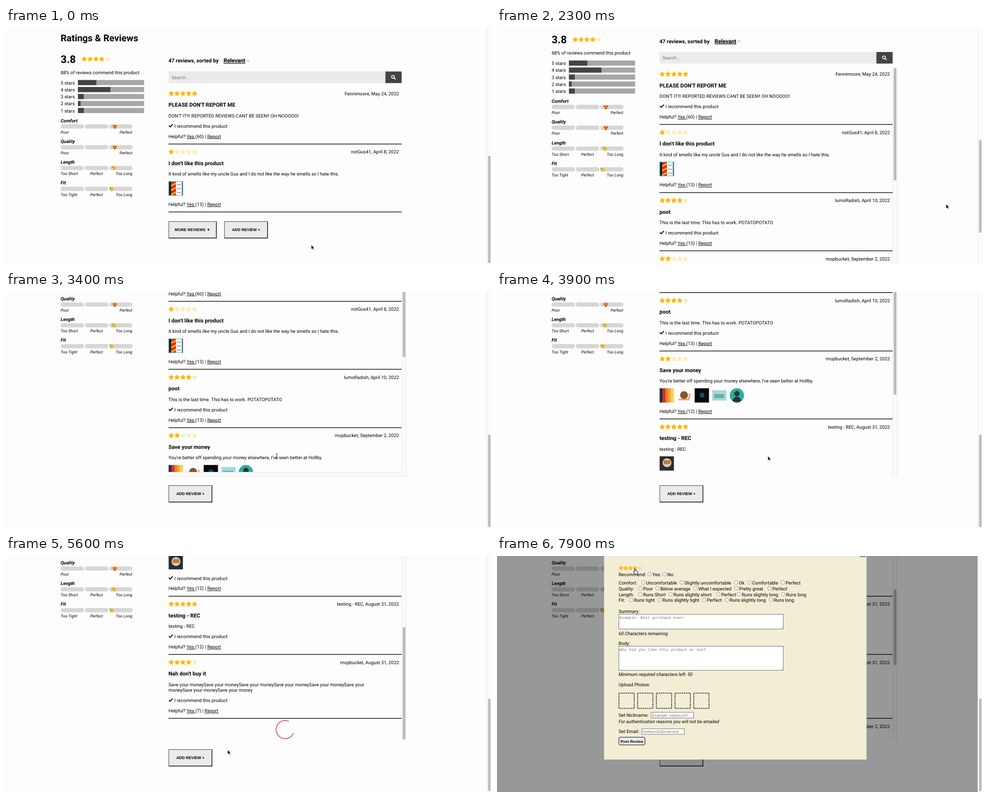
An HTML page that plays this animation: 985x480 px, repeating every 8 s.

```html
<!DOCTYPE html>
<html lang="en">
<head>
<meta charset="utf-8">
<title>Ratings &amp; Reviews</title>
<style>
html, body { margin: 0; width: 100%; height: 100%; overflow: hidden; background: #fdfdfd; }
svg { display: block; }
text { font-family: Roboto, sans-serif; white-space: pre; text-rendering: geometricPrecision; }
.b { font-weight: 700; }
.i { font-style: italic; }
.u { text-decoration: underline; }
.a { font-family: "Liberation Sans", Arial, sans-serif; }
.m { font-family: "Liberation Mono", "Courier New", monospace; }
.p { fill: #757575; }
</style>
</head>
<body>
<svg id="stage" width="985" height="480" viewBox="0 0 985 480"></svg>
<script>
const BODY = 9.45, SMALL = 7.9;
const GOLD = '#ffb70f', PALE = '#fdebbb';

// --- drawing helpers; y is the vertical middle of a text line ---
const text = (x, y, s, cls = '', size = BODY, anchor = 'start') =>
  `<text x="${x}" y="${y + size * .355}" class="${cls}" font-size="${size}" text-anchor="${anchor}">${s}</text>`;
const rect = (x, y, w, h, fill, more = '') =>
  `<rect x="${x}" y="${y}" width="${w}" height="${h}" fill="${fill}" ${more}/>`;
const disc = (x, y, r, fill, more = '') =>
  `<circle cx="${x}" cy="${y}" r="${r}" fill="${fill}" ${more}/>`;
const line = (d, color = '#000', width = 1, more = '') =>
  `<path d="${d}" fill="none" stroke="${color}" stroke-width="${width}" ${more}/>`;
const group = (id, s, more = '') => `<g id="${id}" ${more}>${s}</g>`;

function star(x, y, r, fill, cls = '') {
  const points = Array.from({ length: 10 }, (_, k) => {
    const a = (k / 5 - .5) * Math.PI, d = k % 2 ? r * .52 : r;
    return `${(x + d * Math.cos(a)).toFixed(2)},${(y + .3 + d * Math.sin(a)).toFixed(2)}`;
  });
  return `<polygon class="${cls}" points="${points.join(' ')}" fill="${fill}" stroke="${fill}" stroke-width=".9" stroke-linejoin="round"/>`;
}
const stars = (x, y, n) =>
  [0, 1, 2, 3, 4].map(k => star(x + k * 11.85, y, 5.3, k < n ? GOLD : PALE)).join('');

// --- left column ---
const faces = {
  love: disc(0, 0, 4.7, '#ffc83d') + disc(-2.3, -1.2, 1.8, '#e8253c') + disc(2.3, -1.2, 1.8, '#e8253c') +
    '<path d="M-2.3 1.3H2.3Q1.8 3.8 0 3.8T-2.3 1.3Z" fill="#6b3a1a"/>',
  sweat: disc(0, 0, 4.7, '#ffc83d') + line('M-2.5-.6h1.8M1-.6h1.8M-1 2.6q1-1 2.2 0', '#6b3a1a', .8) +
    disc(-3, -2.2, 1.6, '#55b4e8')
};
function trait(k, name, labels, face, x) {
  const y = 188.2 + k * 42.3;
  const ends = [[111, 'start'], [184, 'middle'], [256.5, 'end']];
  return text(111, y, name, 'b i') +
    [111, 160.2, 209.4].map(s => rect(s, y + 7.7, 47.5, 8.6, '#d6d6d6', 'rx="4.3"')).join('') +
    `<g transform="translate(${x} ${y + 12.2})">${faces[face]}</g>` +
    labels.map((s, n) => text(ends[n][0], y + 23.6, s, 'i', 8.27, ends[n][1])).join('');
}
const summary =
  text(111, 20.5, 'Ratings &amp; Reviews', 'b', 18.95) +
  text(111, 63, '3.8', 'b', 21.3) + stars(159, 63, 4) +
  text(111, 90.5, '88% of reviews commend this product') +
  [37.5, 66, 12, 5.5, 12].map((w, k) => {
    const y = 111 + k * 14.2;
    return text(111, y + .4, `${5 - k} stars`) + rect(146, y - 5.2, 134.5, 10.4, '#a6a6a6') + rect(146, y - 5.2, w, 10.4, '#444');
  }).join('') +
  trait(0, 'Comfort', ['Poor', '', 'Perfect'], 'love', 221) +
  trait(1, 'Quality', ['Poor', '', 'Perfect'], 'love', 221) +
  trait(2, 'Length', ['Too Short', 'Perfect', 'Too Long'], 'sweat', 219.5) +
  trait(3, 'Fit', ['Too Tight', 'Perfect', 'Too Long'], 'sweat', 214.5);

const header =
  text(330, 66.5, '47 reviews, sorted by', 'b', 10.65) +
  rect(441, 61, 46, 11, '#ebebeb') + text(442, 66.5, 'Relevant', 'b u', 11.2) +
  line('M489 65.3l2.4 2.2 2.4-2.2', '#444', .9) +
  rect(330, 88.5, 440.5, 23.5, '#ebebeb') + text(336, 100.4, 'Search...', 'p') +
  rect(770.5, 88.5, 33, 23.5, '#444') +
  disc(786, 99.4, 2.9, 'none', 'stroke="#fff" stroke-width="1.5"') + line('M788.2 101.6l3 3', '#fff', 1.8);

// --- review list ---
const pics = {
  card: rect(0, 0, 29, 29, '#fff') + rect(0, 0, 6, 29, '#181818') + rect(5, 0, 10, 29, '#d8321f') +
    line('M5 9l10-5M5 18l10-5M5 27l10-5', '#f6b21b', 3) + line('M17 7h8M17 15h8M17 23h8', '#888', 1.5) +
    rect(27, 0, 2, 29, '#222') + rect(.5, .5, 28, 28, 'none', 'stroke="#35b8e0"'),
  stripes: ['#1f2f3f', '#c8322c', '#ee7a24', '#f4a52a', '#fad06a'].map((c, k) => rect(k * 5.8, 0, 5.9, 29, c)).join(''),
  snail: disc(14, 14, 8, '#8a5528') + line('M3 23h20l3-13', '#d9a765', 3),
  night: rect(0, 0, 29, 29, '#07090c') + disc(15, 14, 5, '#12535f'),
  sea: rect(0, 4, 29, 21, '#a5d9e4') + rect(4, 12, 20, 8, '#6fae9c'),
  person: disc(14.5, 14.5, 14.5, '#2bae9c') + disc(14.5, 11, 5.5, '#26333a') +
    '<path d="M5 25q9.5-16 19 0-9.5 8-19 0Z" fill="#26333a"/>',
  lunch: rect(0, 0, 29, 29, '#2c2d33') + disc(15, 13, 9, '#d9cdbd') + rect(8, 8, 14, 8, '#c47a35', 'rx="3"')
};
const reviews = [
  { by: 'Fennimoore, May 24, 2022', n: 5, title: "PLEASE DON'T REPORT ME",
    body: ["DON'T IT!!! REPORTED REVIEWS CANT BE SEEN!! OH NOOOOO!"], rec: 1, yes: 60 },
  { by: 'notGus41, April 8, 2022', n: 1, title: "I don't like this product",
    body: ['It kind of smells like my uncle Gus and I do not like the way he smells so I hate this.'], pics: ['card'], yes: 13 },
  { by: 'lumoRadish, April 10, 2022', n: 4, title: 'poot',
    body: ['This is the last time. This has to work. POTATOPOTATO'], rec: 1, yes: 13 },
  { by: 'mopbucket, September 2, 2022', n: 2, title: 'Save your money',
    body: ["You're better off spending your money elsewhere, I've seen better at Hollby."],
    pics: ['stripes', 'snail', 'night', 'sea', 'person'], yes: 12 },
  { by: 'testing - REC, August 31, 2022', n: 5, title: 'testing - REC', body: ['testing - REC'], pics: ['lunch'], rec: 1, yes: 12 },
  { by: 'testing - REC, August 31, 2022', n: 5, title: 'testing - REC', body: ['testing - REC'], rec: 1, yes: 12 },
  { by: 'mopbucket, August 31, 2022', n: 4, title: "Nah don't buy it",
    body: ['Save your money'.repeat(5) + 'Save your', 'money' + 'Save your money'.repeat(2)], rec: 1, yes: 7 },
  { by: 'mopbucket, September 2, 2022', n: 2, title: 'Save your money', body: ['Save your money'], yes: 7, late: 1 }
];
let reviewY = 133.2;
function review(r) {
  let y = reviewY + 45;
  let s = stars(335.6, reviewY, r.n) + text(798, reviewY, r.by, '', BODY, 'end') +
    text(330, reviewY + 23.3, r.title, 'b', 11);
  r.body.forEach((row, k) => s += text(330, y + k * 11.4, row));
  y += (r.body.length - 1) * 11.4 + 21;
  if (r.pics) {
    s += r.pics.map((p, k) => `<g transform="translate(${330.3 + k * 35.6} ${y - 6})">${pics[p]}</g>`).join('');
    y += 40.8;
  }
  if (r.rec) {
    s += line(`M330.8 ${y - .8}l2.6 2.7 5.4-5.6`, '#000', 1.8) + text(342, y + .2, 'I recommend this product');
    y += 21;
  }
  s += text(330, y, `Helpful? <tspan class="u">Yes </tspan>(${r.yes}) | <tspan class="u">Report</tspan>`);
  s += line(`M330 ${y + 15.7}H803.5`, '#222', 1.5);
  reviewY = y + 31.6;
  return r.late ? group('late', s) : s;
}
const list = reviews.map(review).join('') +
  group('spin', disc(0, 0, 21, 'none', 'stroke="#cf2222" stroke-width="1.4" pathLength="4" stroke-dasharray="3 1" transform="rotate(135)"'));

const button = (id, x, w, label) => group(id,
  rect(x, 393, w, 35, '#ebebeb', 'class="face"') +
  line(`M${x} 427.3H${x + w - .7}V393`, '#111', 1.4) + line(`M${x + .6} 428V393.6H${x + w}`, '#666', 1.2) +
  text(x + w / 2, 410.3, label, 'a b', SMALL, 'middle'));

// --- review form ---
const choices = [
  [37.8, 'Recommend:', [310, 'Yes:', 340, 'No:']],
  [54.5, 'Comfort:', [297, 'Uncomfortable', 375, 'Slightly uncomfortable', 485.5, 'Ok', 512.5, 'Comfortable', 580.5, 'Perfect']],
  [66.3, 'Quality:', [291, 'Poor', 326, 'Below average', 403, 'What I expected', 486, 'Pretty great', 553.5, 'Perfect']],
  [78.2, 'Length:', [291, 'Runs Short', 352.5, 'Runs slightly short', 449.5, 'Perfect', 491.5, 'Runs slightly long', 581, 'Runs long']],
  [90, 'Fit:', [272.5, 'Runs tight', 330.5, 'Runs slightly tight', 420.5, 'Perfect', 466.5, 'Runs slightly long', 556, 'Runs long']]
];
const choiceRow = ([y, name, items]) => text(247, y, name) + items.map((v, k) =>
  k % 2 ? text(items[k - 1] + 5.7, y, v) : disc(v, y - .7, 3.7, '#fff', 'stroke="#767676" stroke-width=".8"')).join('');
const field = (x, y, w, h) => rect(x + .5, y + .5, w - 1, h - 1, '#fff', 'stroke="#767676"');
const area = (y, h, hint) => field(247, y, 335, h) + text(249, y + 7, hint, 'm p', SMALL) +
  line(`M576.5 ${y + h - 2}l4-4M579 ${y + h - 2}l1.5-1.5`, '#888', .7);
const form =
  rect(0, 0, 977, 480, '#000', 'opacity=".4"') + rect(217.5, 0, 533, 414, '#f2edd5') +
  rect(737.5, -10, 11.5, 11.5, '#efefef', 'stroke="#222" rx="2"') +
  [0, 1, 2, 3, 4].map(k => star(252 + k * 9.5, 24.5, 4.4, '#dddde0', 'rate')).join('') +
  choices.map(choiceRow).join('') +
  text(247, 112.6, 'Summary:') + area(118, 31, 'Example: Best purchase ever!') +
  text(247, 157.3, '60 Characters remaining', 'i') +
  text(247, 178, 'Body:') + area(183, 50, 'Why did you like this product or not?') +
  text(247, 241, 'Minimum required characters left: 50', 'i') +
  text(247, 262, 'Upload Photos:') +
  [0, 1, 2, 3, 4].map(k => rect(247.6 + k * 38, 278.8, 31, 31, 'none', 'stroke="#000" stroke-width="1.3" stroke-dasharray="3 1.43"')).join('') +
  text(247, 323.6, 'Set Nickname:') + field(312.5, 317.5, 87.5, 12.5) + text(315, 324, 'Example: harbour42!', 'a p', SMALL) +
  text(247, 336.3, 'For authentication reasons you will not be emailed', 'i') +
  text(247, 357, 'Set Email:') + field(293.5, 350.8, 87.5, 12.5) + text(295.5, 357.3, 'harbour42@mail.test', 'a p', SMALL) +
  rect(247.5, 368.7, 53, 15.5, '#efefef', 'stroke="#000" rx="2.5"') + text(274, 376.7, 'Post Review', 'a b', SMALL, 'middle');

const stage = document.getElementById('stage');
stage.innerHTML =
  '<clipPath id="clip"><rect id="port" x="325" y="119" width="479" height="261"/></clipPath>' +
  rect(0, 0, 985, 480, '#fdfdfd') +
  group('page', summary + header +
    group('frame', rect(803.5, 119, 9, 473, '#fafafa') + line('M803.5 119V592M812.5 119V592', '#e8e8e8') +
      group('across', rect(330, 583, 482, 9, '#fafafa') + line('M330 583.5H803.5M330 592H812', '#e4e4e4')) +
      rect(805.7, 120.7, 5.4, 229, '#bababa', 'id="thumb" rx="2.7"')) +
    group('view', group('list', list), 'clip-path="url(#clip)"') +
    button('more', 330, 98, 'MORE REVIEWS ▼') + button('add', 443, 89, 'ADD REVIEW +')) +
  group('form', form) +
  rect(976.5, 0, 9, 480, '#fafafa') + line('M976.5 0V480', '#e8e8e8') +
  rect(979, 260, 5.2, 218, '#bdbdbd', 'id="bar" rx="2.6"') +
  group('cursor',
    '<path id="arrow" d="M0 0V9.5L2.2 7.5 3.7 10.8 5.2 10.1 3.8 7H6.6Z" stroke="#fff" stroke-width=".8"/>' +
    line('M-1.8-4.5Q0-4.5 0-3V3.5Q0 5-1.8 5M1.8-4.5Q0-4.5 0-3M0 3.5Q0 5 1.8 5', '#222', .9, 'id="beam"') +
    '<path id="hand" d="M-.8 6V.8a1 1 0 0 1 2 0V4l4 .8q1 .4 .8 1.6L5 11H1L-2.8 6.8q0-1.4 2-.8Z" fill="#fff" stroke="#000" stroke-width=".9"/>');

// --- motion ---
const $ = id => document.getElementById(id);
const rates = [...document.querySelectorAll('.rate')];
const LOOP = 8000, STEP = 100, GROW = 217;
const OPEN = 1300, LOADED = 6000, MODAL = 6450;
const route = [[0, 620, 441], [100, 620, 441], [900, 385, 412], [1300, 385, 412], [2100, 912, 358], [2800, 912, 358],
  [3300, 550, 333.5], [4600, 550, 333.5], [5600, 450, 394], [6200, 412, 414], [6700, 412, 414], [7800, 280, 26], [LOOP, 280, 26]];

function ease(t, from, to) {
  const p = Math.min(1, Math.max(0, (t - from) / (to - from)));
  return p * p * (3 - 2 * p);
}
function cursorAt(t) {
  const k = route.findIndex(r => r[0] > t);
  const [t0, x0, y0] = route[k - 1], [t1, x1, y1] = route[k];
  const p = ease(t, t0, t1);
  return [x0 + (x1 - x0) * p, y0 + (y1 - y0) * p];
}
const set = (id, values) => { for (const n in values) $(id).setAttribute(n, values[n]); };
const show = (id, on) => set(id, { display: on ? 'inline' : 'none' });

function draw(t) {
  const open = t >= OPEN, loaded = t >= LOADED, modal = t >= MODAL;
  const scroll = GROW * ease(t, 2150, 2700);
  const inner = 493 * ease(t, 3600, 4400) - (t > 4900 ? 1 : 0);
  const [x, y] = cursorAt(t);

  set('page', { transform: `translate(0 ${-scroll})` });
  set('list', { transform: `translate(0 ${-inner})` });
  set('port', { height: !open ? 261 : inner < 5 ? 464 : 473 });
  set('bar', open ? { y: 214 + scroll * .35, height: 188.5 } : { y: 260, height: 218 });
  set('thumb', loaded ? { y: 285, height: 154 } : { y: 120.7 + inner * .489, height: 229 });
  set('add', { transform: open ? `translate(-113 ${GROW})` : 'translate(0 0)' });
  show('frame', open);
  show('across', inner < 5);
  show('more', !open);
  show('late', loaded);
  show('spin', !loaded);
  show('form', modal);

  const turn = ((82 + (t - 4500) * .48) % 360 + 360) % 360;
  const size = .8 + .2 * Math.abs(turn / 180 - 1);
  set('spin', { transform: `translate(567 1062) rotate(${turn}) scale(${size})` });

  const over = (left, right) => x > left && x < right && y > 393 && y < 428;
  const paint = (id, hot) => $(id).querySelector('.face').setAttribute('fill', hot ? '#888' : '#ebebeb');
  paint('more', !open && over(330, 428));
  paint('add', scroll === GROW && over(330, 419));

  const rating = modal && y < 31 ? Math.floor((x - 247) / 9.5) + 1 : 0;
  rates.forEach((r, k) => ['fill', 'stroke'].forEach(n => r.setAttribute(n, k < rating ? GOLD : '#dddde0')));

  const beam = t >= 3300 && t < 3700;
  set('cursor', { transform: `translate(${x} ${y})` });
  show('beam', beam);
  show('hand', rating > 0);
  show('arrow', !beam && !rating);
}
const start = performance.now();
function tick() {
  const t = (performance.now() - start) % LOOP;
  draw(Math.floor(t / STEP) * STEP);
  requestAnimationFrame(tick);
}
tick();
</script>
</body>
</html>
```
